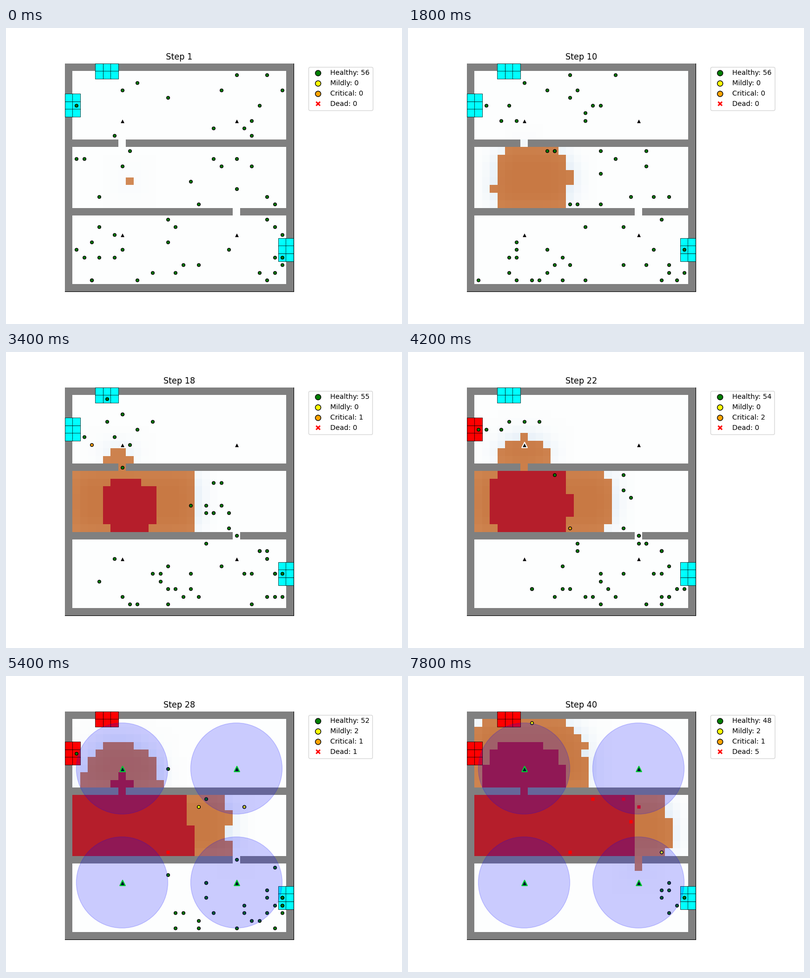
Write a matplotlib script that moves like this. It is 800 by 600 pixels and loops after 8 s.

```python
import random

import matplotlib.pyplot as plt
import numpy as np
from matplotlib.animation import FuncAnimation
from matplotlib.lines import Line2D
from matplotlib.patches import Circle

N, STEPS = 30, 40
BURN_TIME = 11        # steps until a burning cell turns deep red
ALARM = 23
DETECTORS = [(7, 7), (22, 7), (7, 22), (22, 22)]
# column, row, width, height, step at which it closes, doorway cell
EXITS = [(4, 0, 3, 2, 26, (5, 1)),
         (0, 4, 2, 3, 21, (1, 5)),
         (28, 23, 2, 3, 99, (28, 24))]
TOP, LEFT, RIGHT = (e[5] for e in EXITS)

rng = random.Random(4)

# ---------------------------------------------------------------- building
rows, cols = np.mgrid[:N, :N]
free = np.zeros((N, N))
free[1:-1, 1:-1] = 1
free[[10, 19]] = 0
free[10, 7] = free[19, 22] = 1


# -------------------------------------------------------------------- fire
def wave(col, row, start, kx, ky):
    """Step at which a slowing fire front from one cell reaches each cell."""
    dx, dy = np.abs(cols - col) * kx, np.abs(rows - row) * ky
    return start + (dx ** 2.3 + dy ** 2.3) ** (1.13 / 2.3)


# The fire starts in the middle room and enters the others by the gaps.
lit = np.where(rows > 18, wave(22, 19, 38.5, 1.4, 1.4),
               np.where(rows > 10, wave(8, 15, 0.8, 1.43, 1.43),
                        wave(7, 10, 13, 2.1, 1.7)))
lit += np.random.default_rng(8).uniform(-0.9, 0.9, lit.shape) * (lit > 1)
lit[free == 0] = np.inf


def blur(a):
    p = np.pad(a, 1)
    return free * sum(p[i:i + N, j:j + N]
                      for i in range(3) for j in range(3)) / 9


def mix(a, b, t):
    return np.array(a) + (np.array(b) - np.array(a)) * t[..., None]


def floor_image(step):
    fire = lit <= step
    haze = fire * 1.0
    for _ in range(3):
        haze = blur(haze)
    img = mix((253, 254, 254), (208, 225, 242), haze)
    img[fire] = mix((213, 143, 91), (200, 121, 68), haze ** 0.5)[fire]
    img[lit <= step - BURN_TIME] = (181, 30, 43)
    img[free == 0] = 128
    return img.astype(np.uint8)


# ------------------------------------------------------------------ people
STATES = ["Healthy", "Mildly", "Critical", "Dead"]
COLORS = ["green", "yellow", "orange", "red"]
# cell where hurt, then steps of mild harm, critical harm and death
VICTIMS = [((7, 7), 12, 13, 99), ((13, 18), 20, 21, 27),
           ((16, 11), 29, 30, 32), ((20, 11), 27, 29, 32),
           ((21, 14), 28, 30, 33), ((22, 12), 31, 33, 39),
           ((26, 18), 40, 99, 99), ((8, 1), 39, 99, 99)]
# first row, last row, people who are never hurt
ROOMS = [(1, 9, 11), (11, 18, 11), (20, 28, 26)]


def around(c, reach=1):
    k = range(-reach, reach + 1)
    near = [(c[0] + i, c[1] + j) for i in k for j in k]
    return [(x, y) for x, y in near
            if 0 <= x < N and 0 <= y < N and free[y, x]]


fields = {}


def field(goal):
    """Walking distance from every free cell to the goal."""
    if goal not in fields:
        dist, todo = {goal: 0}, [goal]
        for c in todo:
            for n in around(c):
                if n not in dist:
                    dist[n] = dist[c] + 1
                    todo.append(n)
        fields[goal] = dist
    return fields[goal]


def heat(c):
    return lit[c[1], c[0]]


def advance(cell, goal, due, step):
    """Wander away from the fire, but set off in time to reach the goal."""
    near = around(cell)
    dist = field(goal)
    if due - step < dist[cell]:
        near = [c for c in near if dist[c] < dist[cell]] or [cell]
    safe = [c for c in near if heat(c) > step + 3]
    return rng.choice(safe) if safe else max(near, key=heat)


def simulate(cell, goal, due, leaves, harm=()):
    """List (cell, state) for every step; the cell is None after leaving."""
    life = []
    for step in range(1, STEPS + 1):
        if step > 1 and cell:
            if cell == goal and step >= due:
                cell = None if leaves else goal
            else:
                cell = advance(cell, goal, due, step)
        life.append((cell, sum(step >= h for h in harm)))
    return life


def make_people():
    people = []
    for spot, *harm in VICTIMS:
        start = rng.choice([c for c in around(spot, 4) if heat(c) > 4])
        escapes = spot == DETECTORS[0]
        due = min(harm[1], STEPS)
        life = simulate(start, spot, due, False, harm)
        if escapes:
            way_out = simulate(spot, LEFT, 8, True)
            life[due:] = [(c, 2) for c, _ in way_out[1:STEPS - due + 1]]
        people.append(life)

    starts = [(rng.randint(1, N - 2), rng.randint(a, b))
              for a, b, n in ROOMS for _ in range(n)]
    starts.sort(key=lambda c: c[1] + rng.uniform(0, 16))
    for rank, start in enumerate(starts):
        due = round(STEPS * (rank / 41) ** 0.6)
        door = RIGHT if start[1] > 9 else LEFT if due < 16 else TOP
        people.append(simulate(start, door, due, True))
    return people


people = make_people()

# ----------------------------------------------------------------- drawing
fig, ax = plt.subplots(figsize=(8, 6), dpi=100)
fig.subplots_adjust(right=0.75)
ax.set_xticks([])
ax.set_yticks([])
ax.spines[["left", "top"]].set_visible(False)
image = ax.imshow(floor_image(1), interpolation="nearest")
title = ax.set_title("Step 1")

exits = []
for x, y, w, h, closes, _ in EXITS:
    tiles = [(x + i, y + j) for i in range(w) for j in range(h)]
    squares = ax.scatter(*zip(*tiles), marker="s", s=120, c="cyan",
                         edgecolors="black", lw=0.5)
    exits.append((squares, closes))

sensors = ax.scatter(*zip(*DETECTORS), marker="^", s=60, c="black",
                     edgecolors="white", lw=1.5)
dots = [ax.scatter([], [], s=20, c=c, edgecolors="black", lw=1)
        for c in COLORS[:3]]
dots.append(ax.scatter([], [], s=20, c=COLORS[3], marker="X"))
rings = [ax.add_patch(Circle(c, 6, color="blue", alpha=0.2, visible=False))
         for c in DETECTORS]
ax.set_xlim(-0.5, N - 0.5)
ax.set_ylim(N - 0.5, -0.5)


def key(color, label):
    dead = label == "Dead"
    return Line2D([0], [0], color="w", marker="X" if dead else "o",
                  markersize=8, markerfacecolor=color, label=label,
                  markeredgecolor="white" if dead else "black")


legend = ax.legend(handles=[key(c, s) for c, s in zip(COLORS, STATES)],
                   loc="upper left", bbox_to_anchor=(1.05, 1))


def draw(frame):
    step = frame + 1
    title.set_text(f"Step {step}")
    image.set_data(floor_image(step))
    for squares, closes in exits:
        squares.set_facecolor("red" if step >= closes else "cyan")
    sensors.set_edgecolor("lime" if step >= ALARM else "white")
    for ring in rings:
        ring.set_visible(step >= ALARM)

    now = [life[frame] for life in people]
    for state, text in enumerate(legend.get_texts()):
        group = [c for c, s in now if s == state]
        seen = [c for c in group if c]
        dots[state].set_offsets(np.array(seen, float).reshape(-1, 2))
        text.set_text(f"{STATES[state]}: {len(group)}")


anim = FuncAnimation(fig, draw, frames=STEPS, interval=200, repeat=True,
                     repeat_delay=0, blit=False)
plt.show()
```
